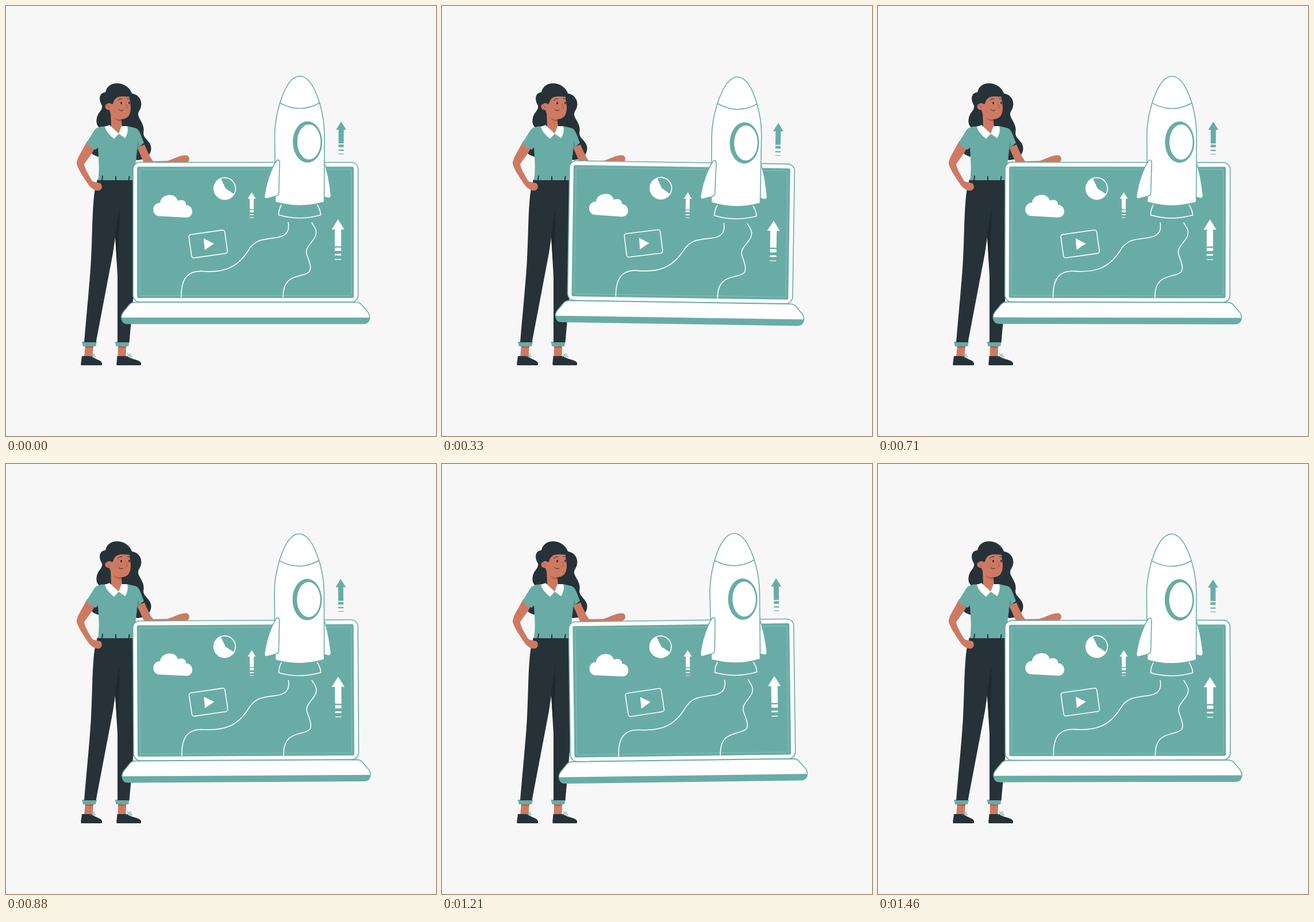
Animation, 748 px wide and 748 px high, one loop 1500 ms. Source, as an HTML page:

```html
<!DOCTYPE html>
<html lang="en">
<head>
<meta charset="utf-8">
<title>Launch</title>
<style>
  html, body { margin: 0; width: 100%; height: 100%; overflow: hidden; background: #f7f7f7; }
  svg { display: block; width: 100%; height: 100%; }
  .teal { fill: #69aca6; }
  .dark { fill: #263238; }
  .skin { fill: #ce7a63; }
  .white { fill: #fff; }
  .panel { fill: #fff; stroke: #69aca6; stroke-width: 1.6; stroke-linejoin: round; }
  .line { fill: none; stroke: #fff; stroke-width: 1.6; stroke-linecap: round; }
  .ink { fill: none; stroke: #263238; stroke-width: 1; stroke-linecap: round; }
  .shade { fill: none; stroke: #a9573f; stroke-width: 1; stroke-linecap: round; }
  .lace { fill: none; stroke: #69aca6; stroke-width: 1; }
</style>
</head>
<body>
<svg viewBox="0 0 748 748">
  <defs>
    <path id="arrow" d="M0 0L15.7 25H7.9V66.5H-7.9V25H-15.7ZM-7.9 70H7.9V78H-7.9ZM-7.9 85.5H7.9V89.5H-7.9ZM-7.9 98H7.9V100H-7.9Z"/>
    <g id="foot">
      <path class="skin" d="M138 590H152L150.500 611H136Z"/>
      <path fill="#b0604a" d="M138 591H152L151.800 594.500H137.700Z"/>
      <path class="dark" d="M132 609H149C154 615 165 615 167 621V623.500Q167 625 165 625H131Q130 625 130.300 622Z"/>
      <path class="lace" d="M147 611C153 602 157 605 151 609C158 608 157 612 150 611M151 609L149 604"/>
      <path class="teal" d="M132 584H158L156 592H134Z"/>
    </g>
  </defs>

  <g id="woman">
    <path class="dark" d="M193 134.500C205 134.500 215 141 219 152C230 154 237 163 235 174C234 181 229 184 230 190C233 200 242 207 239 221C239 231 253 236 252.500 248C252 260 243 267 229 268L190 262H160C151 259 146 256 148 248L163 212C155 206 157 195 160 189C164 182 168 180 167 173C161 164 161 151 173 150C175 140 183 134.500 193 134.500Z"/>
    <use href="#foot"/>
    <use href="#foot" x="57" transform="translate(193 0) scale(1.16 1) translate(-250 0)" visibility="hidden"/>
    <g>
      <path class="skin" d="M195 590H209L208.500 611H194.500Z"/>
      <path fill="#b0604a" d="M195 591H209V594.500H195Z"/>
      <path class="dark" d="M193.500 609H211C217 615 233 615 235 621V623.500Q235 625 233 625H193Q192 625 192.300 622Z"/>
      <path class="lace" d="M209 611C215 602 221 605 214 609C222 608 221 612 213 611M214 609L211 604"/>
      <path class="teal" d="M189.500 584H214.500L213 592H191.500Z"/>
    </g>
    <path class="dark" d="M159 302H222L228 400L222 500L214.500 585H194L194 470L190 402L186 430L156.500 585H136C140 535 146 480 148 440C150 405 150 365 152 345C153 325 156 312 159 302Z"/>
    <path fill="#1e282d" d="M197 351C195 372 190 387 190 402L194 456C194 425 199 390 197 351Z"/>

    <path class="skin" d="M228 246L241 241C245 251 250 262 256 270L281 269.500C292 266 301 260 312 259.500C320 259.500 320 267 317 271L300 279L243 280Z"/>
    <path class="skin" d="M141 235C134 250 125 261 123 272C122 280 137 301 145 313C151 320 160 323 164 320C168 317 167 312 165 309C160 306 153 308 149 303C144 294 137 283 136 275C142 266 150 257 155 246Z"/>
    <path class="teal" d="M173 209C162 210 156 211 152 219L140 238Q147 247 156 250L160 246C161 264 163 286 160 303H223L226 268L228 248L240 238C235 226 232 213 224 212L211 209Z"/>
    <path fill="#4c8c87" d="M229.500 234C229 247 226 256 226 269L229 248L231.500 244Z"/>
    <path class="ink" stroke-width="2" style="stroke-width:2" d="M168 296L167 304M191 297V304M214.500 297L213.500 304"/>

    <path class="skin" d="M182 185L183 209L195 222L202 210L200 193Z"/>
    <path fill="#a9573f" d="M187 193Q194 199 200 197V200Q192 201 187 193Z"/>
    <path class="white" d="M180 207L172 210Q174 220 188 231L196 222ZM201 209L211 209Q214 219 207 230L196 222Z"/>
    <path class="skin" d="M186 166C183 172 181 168 177 169C170 171 171 181 180 181C182 190 188 197 199 197C212 197 217 190 217 176L214.500 156H190Z"/>
    <path class="dark" d="M173 151C178 139 204 136 214 150L215 158C205 157 194 156 190 162C186 165 188 170 184 171C182 167 176 169 174 172Z"/>
    <path class="shade" d="M175 173Q180 173 179 178M209 170L211.500 177L208.500 178"/>
    <path class="ink" d="M194.500 164.500Q197 160.500 202 161.500M211 161Q214 160 216 162.500M196 180Q200 184 204 181"/>
    <ellipse class="dark" cx="200.500" cy="169" rx="1.500" ry="2.300"/>
    <ellipse class="dark" cx="214.300" cy="168.500" rx="1.300" ry="2.200"/>
  </g>

  <g id="laptop">
    <rect class="panel" x="221" y="272" width="391.500" height="243" rx="12"/>
    <rect class="teal" x="228" y="279.500" width="377" height="228.500" rx="3"/>
    <rect x="232.500" y="284" width="368" height="219.500" rx="2" fill="none" stroke="#97c6c2" stroke-width=".7"/>
    <path class="panel" d="M222 515.500H611Q615.500 516 618 519L630 533Q634 538 632 545Q630 552.500 622 552.500H211Q203 552.500 201.500 545Q199 539 203.500 533L215 519Q218 516 222 515.500Z"/>
    <path class="teal" d="M200.800 542H632.700Q632 552.500 622 552.500H211Q202 552.500 200.800 542Z"/>

    <path class="white" d="M267 365.500C252 365 253 342 268 342.500C269 327 295 323 299 339C307 335 314 340 313 346C328 347 327 369 313 368Z"/>
    <circle class="white" cx="380.500" cy="317.500" r="19.700"/>
    <path class="teal" d="M382 317.500L374 300.600A18.200 18.200 0 0 1 396 326.800Z"/>
    <g transform="translate(351.700 414) rotate(-8)">
      <rect class="line" x="-31.500" y="-20.500" width="63" height="41" rx="4"/>
      <path class="white" d="M-6.500 -10.500L10 .7L-7.500 9.500Z"/>
    </g>
    <use href="#arrow" class="white" transform="translate(427.500 324) scale(.445)"/>
    <use href="#arrow" class="white" transform="translate(577.500 371) scale(.705)"/>
    <use href="#arrow" class="teal" transform="translate(583 201) scale(.57)"/>
    <path class="line" d="M491 377C494 394 485 401 470 403C446 406 433 406 421 426C402 456 378 464 342 461.500C318 460 304 472 305 507M532 377C538 387 542 391 538 401C532 413 519 420 523.500 433C528 446 532 454 528 462C516 474 481 463 482 507"/>

    <path class="panel" d="M553 272C560 286 563 308 565.500 329Q565.500 335 560 334L553 332Z"/>
    <path class="line teal" style="fill:#69aca6" d="M479 346Q474 355 474.500 363.500Q511 374 547.500 363.500Q547 355 541.500 346"/>
    <path class="panel" d="M511 122C528 122 539 148 545.500 168.500C551 187 554 203 554 225L553.500 341Q511 353.500 468.500 341L467.500 225C467.500 203 471 187 476.500 168.500C483 148 494 122 511 122Z"/>
    <path class="panel" style="fill:none" d="M476.500 168.500Q511 188 545.500 168.500"/>
    <path class="panel" d="M471 268.500Q476 266 476 273L474.500 325Q474 330 469 331L454 335Q449 336 449.500 330C453 308 460 285 471 268.500Z"/>
    <ellipse class="teal" cx="524.500" cy="236.500" rx="25.500" ry="36"/>
    <ellipse class="white" cx="527" cy="236.500" rx="20.300" ry="30.500"/>
  </g>
</svg>
<script>
  const LOOP = 1500, FPS = 24;
  const laptop = document.getElementById("laptop");

  // Triangle wave: 0 -> +1 degree -> -1 degree -> 0
  const sway = p => p < .25 ? 4 * p : p < .75 ? 2 - 4 * p : 4 * p - 4;

  function draw(now) {
    const step = Math.floor((now % LOOP) * FPS / 1000 + .1);
    laptop.setAttribute("transform", `rotate(${sway(step / (LOOP * FPS / 1000))} 416.500 337)`);
    requestAnimationFrame(draw);
  }
  draw(performance.now());
</script>
</body>
</html>
```
